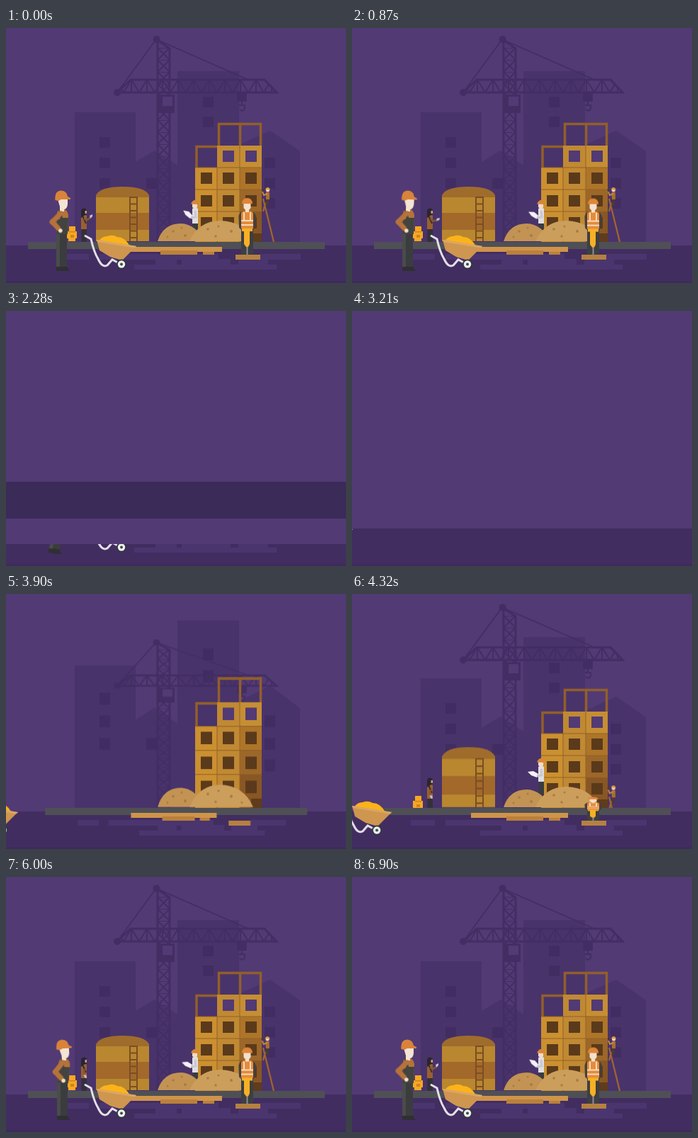
An HTML page without scripts for the animation above (6.93 s loop, 480 by 360 pixels).

```html
<!DOCTYPE html>
<html lang="en">
<head>
<meta charset="utf-8">
<title>Building site</title>
<style>
  html, body { margin: 0; width: 100%; height: 100%; overflow: hidden; background: #523a74; }
  svg { display: block; width: 100vw; height: 100vh; }

  .anim { animation: 6.93s ease-in-out infinite; }
  .panel { animation-name: wipe; }
  .ground { animation-name: ground; }
  .spread { animation-name: spread; transform-origin: 240px 307px; }
  .grow { animation-name: grow; transform-origin: 240px 302px; }
  .rise { animation-name: rise; }
  .crane { animation-name: crane; transform-origin: 222px 302px; }
  .travel { animation-name: travel; animation-timing-function: linear; }
  .gait { animation-name: gait; }
  .torso { animation-name: torso; transform-origin: 79px 288px; }
  .head { animation-name: nod; transform-origin: 79px 257px; }
  .arm { animation-name: arm; transform-origin: 78px 261px; }
  .fore { animation-name: fore; transform-origin: 78px 279px; }
  .thighA { animation-name: thighA; transform-origin: 81px 288px; }
  .kneeA { animation-name: kneeA; transform-origin: 81px 313px; }
  .thighB { animation-name: thighB; transform-origin: 76px 288px; }
  .kneeB { animation-name: kneeB; transform-origin: 76px 313px; }
  .point { animation-name: point; transform-origin: 111px 271px; }
  .paper { animation-name: paper; transform-origin: 263px 267px; }
  .look { animation-name: look; transform-origin: 369px 250px; }
  .drill { animation: drill calc(6.93s / 58) linear infinite; }

  @keyframes wipe {
    0%, 26.97% { transform: translateY(-88px); animation-timing-function: cubic-bezier(.37,0,.63,1); }
    36.06%, 39.2% { transform: translateY(360px); }
    39.21%, 100% { transform: translateY(-88px); }
  }
  @keyframes ground {
    0%, 36.5%, 46.32%, 100% { transform: none; }
    36.51%, 39.6% { transform: translateY(54px); }
  }
  @keyframes spread {
    0%, 36.5%, 58%, 100% { transform: none; }
    36.51%, 51.95% { transform: scaleX(0); animation-timing-function: ease-out; }
  }
  @keyframes grow {
    0%, 36.5%, 61%, 100% { transform: none; }
    36.51%, 51.95% { transform: scaleY(0); animation-timing-function: ease-out; }
    56% { transform: scaleY(1.1); }
    59% { transform: scaleY(.985); }
  }
  @keyframes rise {
    0%, 36.5%, 60%, 100% { transform: none; }
    36.51%, 51.95% { transform: translateY(80px); animation-timing-function: ease-out; }
    56% { transform: translateY(-11px); }
  }
  @keyframes crane {
    0%, 36.5%, 65%, 100% { transform: none; }
    36.51%, 52.7% { transform: scaleY(0); animation-timing-function: ease-out; }
    58.5% { transform: scaleY(1.018); }
    62.34% { transform: scaleY(.99); }
  }
  @keyframes travel {
    0%, 36.5%, 100% { transform: none; }
    36.51%, 53.9% { transform: translateX(-183px); }
    62.34% { transform: translateX(-128px); }
    76.62% { transform: translateX(-34px); animation-timing-function: ease-out; }
    84.4% { transform: none; }
  }
  @keyframes gait {
    0%, 36.5%, 88%, 100% { transform: none; }
    36.6%, 82.7% { transform: translateX(7px); }
  }
  @keyframes torso {
    0%, 17.3%, 88%, 100% { transform: none; }
    25.1% { transform: rotate(7deg); }
    32.9%, 36.5% { transform: rotate(15deg); }
    36.6%, 82.7% { transform: rotate(23deg); }
  }
  @keyframes nod {
    0%, 18%, 90%, 100% { transform: none; }
    9% { transform: rotate(4deg); }
    36.6%, 82.7% { transform: rotate(-16deg); }
  }
  @keyframes arm {
    0%, 18%, 88%, 100% { transform: rotate(45deg); }
    25.1% { transform: rotate(38deg); }
    32.9% { transform: rotate(0); }
    36.6%, 82.7% { transform: rotate(-25deg); }
  }
  @keyframes fore {
    0%, 25.1%, 88%, 100% { transform: rotate(-88deg); }
    36.6%, 82.7% { transform: rotate(-42deg); }
  }
  @keyframes thighA {
    0%, 27%, 87%, 100% { transform: none; }
    32.9%, 36.5% { transform: rotate(12deg); }
    62.34%, 71.86%, 81.39% { transform: rotate(16deg); }
    67.1%, 76.62% { transform: rotate(-13deg); }
  }
  @keyframes kneeA {
    0%, 36.5%, 87%, 100% { transform: none; }
    62.34%, 71.86%, 81.39% { transform: rotate(32deg); }
    67.1%, 76.62% { transform: rotate(18deg); }
  }
  @keyframes thighB {
    0%, 27%, 87%, 100% { transform: none; }
    32.9%, 36.5% { transform: rotate(12deg); }
    62.34%, 71.86%, 81.39% { transform: rotate(-13deg); }
    67.1%, 76.62% { transform: rotate(16deg); }
  }
  @keyframes kneeB {
    0%, 36.5%, 87%, 100% { transform: none; }
    62.34%, 71.86%, 81.39% { transform: rotate(18deg); }
    67.1%, 76.62% { transform: rotate(32deg); }
  }
  @keyframes point {
    0%, 9%, 97%, 100% { transform: none; }
    20%, 86% { transform: rotate(115deg); }
  }
  @keyframes paper {
    0%, 8%, 96%, 100% { transform: rotate(18deg); }
    18%, 84% { transform: none; }
  }
  @keyframes look {
    0%, 50%, 100% { transform: none; }
    25%, 75% { transform: rotate(-2deg); }
  }
  @keyframes drill {
    0%, 100% { transform: none; }
    50% { transform: translateY(1px); }
  }
</style>
</head>
<body>
<svg viewBox="0 0 480 360" preserveAspectRatio="none">
  <defs>
    <clipPath id="above"><path d="M0 0H480V302H0Z"/></clipPath>
    <pattern id="mast" x="214" y="28" width="17" height="17" patternUnits="userSpaceOnUse">
      <path d="M0 0L17 17M17 0L0 17M0 0H17" stroke="#432e64" stroke-width="2"/>
    </pattern>
    <pattern id="truss" x="232" y="73" width="22" height="18" patternUnits="userSpaceOnUse">
      <path d="M0 18L11 0L22 18M11 0V18" fill="none" stroke="#432e64" stroke-width="2"/>
    </pattern>
    <path id="pane" d="M0 0h15v15h-15z"/>
    <path id="win" d="M0 0h16v16h-16z"/>
  </defs>

  <rect width="480" height="360" fill="#523a74"/>
  <g class="anim ground">
    <rect y="307" width="480" height="54" fill="#422d61"/>
    <rect y="357" width="480" height="4" fill="#3e2a5c"/>
  </g>

  <!-- ground streaks -->
  <path class="anim spread" fill="#4b356e" d="M83 319h34v8h-34zM132 319h168v8h-168zM359 319h57v8h-57z
    M211 326h30v8h-30zM248 326h69v8h-69zM328 326h42v8h-42zM181 334h201v7h-201z"/>

  <!-- skyline -->
  <g class="anim grow">
    <path fill="#49336b" d="M97 302V119H183V189L210 173L242 194V61H329V165L373 145L415 174V302Z"/>
    <g fill="#422d62">
      <use href="#pane" x="132" y="154"/><use href="#pane" x="132" y="183"/><use href="#pane" x="132" y="212"/>
      <use href="#pane" x="198" y="212"/>
      <use href="#pane" x="278" y="97"/><use href="#pane" x="278" y="125"/>
      <use href="#pane" x="365" y="183"/><use href="#pane" x="365" y="212"/><use href="#pane" x="365" y="240"/>
    </g>
  </g>

  <g class="anim crane">
    <rect x="214" y="28" width="17" height="274" fill="url(#mast)"/>
    <path fill="url(#truss)" d="M157 91L176 73H365L382 91Z"/>
    <g fill="none" stroke="#432e64" stroke-width="3">
      <path d="M214 16V302M231 28V302M212 16L231 29"/>
      <path d="M157 91H382L365 73H176Z"/>
      <path stroke-width="1.6" d="M212 16L157 91M212 16L342 73"/>
      <path stroke-width="2" d="M333 92V110M329 109H337V114Q334 119 330 115"/>
    </g>
    <g fill="#432e64">
      <circle cx="212.500" cy="16" r="5"/><circle cx="157" cy="91" r="5"/>
      <path d="M215 94H238V120H215ZM326 91H340V104H326Z"/>
    </g>
    <path fill="#523a74" d="M221 97H235V110H221Z"/>
  </g>

  <!-- tank -->
  <g class="anim grow" style="animation-delay:.44s">
    <path fill="#b9872f" d="M127 236H202V301H127Z"/>
    <path fill="#a3692a" d="M127 261H202V285H127Z"/>
    <path fill="#a06c2c" d="M127 239V236Q133 224 164.500 224Q196 224 202 236V239Z"/>
    <path fill="none" stroke="#7b4e24" stroke-width="2" d="M175 238V301M185 238V301M175 239h10M175 248.500h10M175 258h10M175 267.500h10M175 277h10M175 286.500h10M175 296h10"/>
  </g>

  <!-- unfinished block -->
  <g class="anim grow" style="animation-delay:.03s">
    <path fill="none" stroke="#925f2a" stroke-width="3.500" d="M269 198V167.500H298M300.500 167V135.500H359.500V167M330.500 135V167"/>
    <path fill="#cb9030" d="M267 197H298V302H267Z"/>
    <path fill="#c08933" d="M298 166H330V302H298Z"/>
    <path fill="#c68e33" d="M330 166H361V197H330Z"/>
    <path fill="#ae7529" d="M330 197H361V228H330Z"/>
    <path fill="#9c6728" d="M330 228H361V259H330Z"/>
    <path fill="#895724" d="M330 259H361V302H330Z"/>
    <path fill="#5f3c1b" d="M346 290H361V302H346Z"/>
    <path fill="none" stroke="#936226" stroke-width="1" d="M267 197H361M267 228H361M267 259H361M298 197V302M330 166V302"/>
    <g fill="#523a74"><use href="#win" x="306" y="173"/><use href="#win" x="338" y="173"/></g>
    <g fill="#5a3a1b">
      <use href="#win" x="275" y="204"/><use href="#win" x="306" y="204"/><use href="#win" x="338" y="204"/>
      <use href="#win" x="275" y="236"/><use href="#win" x="306" y="236"/><use href="#win" x="338" y="236"/>
      <use href="#win" x="275" y="267"/><use href="#win" x="306" y="267"/><use href="#win" x="338" y="267"/>
    </g>
  </g>

  <g clip-path="url(#above)">
    <!-- surveyor -->
    <g class="anim rise" style="animation-delay:.65s">
      <path fill="none" stroke="#a0642d" stroke-width="2.300" d="M363 241L378 302M366 247L363 259"/>
      <g class="anim look">
        <path stroke="#4a3a35" stroke-width="3.500" d="M369 240V251"/>
        <path fill="#a8702f" d="M367 232H372V242H367Z"/>
        <path fill="none" stroke="#c98a3c" stroke-width="2" d="M369 234L364 236L362 231"/>
        <circle cx="369.500" cy="229" r="2.500" fill="#efd8c2"/>
        <path fill="#dd9a3b" d="M366 228Q367 225 369.500 225Q372 225 373 228.500Z"/>
        <path fill="#4a3a35" d="M361 227H365V230H361Z"/>
      </g>
    </g>
    <!-- engineer -->
    <g class="anim rise" style="animation-delay:.44s">
      <path fill="#3a3c40" d="M263.500 274H271V300H263.500Z"/>
      <path fill="#e0dee4" d="M263 255Q267 252 271 255V276H263Z"/>
      <path fill="#f1dcc8" d="M263 247H270V253L267 256L263 253Z"/>
      <path fill="#d9853b" d="M261 248.500Q263 243 267 243Q271 243 271.500 249Z"/>
      <g class="anim paper">
        <path fill="#f4f2f6" d="M248 262L256 261L263 265L261 270L253 267Z"/>
      </g>
      <path fill="none" stroke="#cbc7d0" stroke-width="3" d="M267 258L268 267L261 268"/>
    </g>
  </g>

  <!-- sand -->
  <g class="anim grow" style="animation-delay:.04s">
    <path fill="#c39353" d="M214 301Q222 276 247 276Q268 277 280 301Z"/>
    <path fill="#cc9e5c" d="M259 301Q272 272 303 272Q336 273 349 301Z"/>
    <g fill="#a87c44">
      <circle cx="236" cy="287" r="1.800"/><circle cx="248" cy="282" r="1.500"/><circle cx="228" cy="295" r="1.500"/><circle cx="253" cy="293" r="2"/>
      <circle cx="285" cy="284" r="1.800"/><circle cx="300" cy="280" r="1.500"/><circle cx="318" cy="287" r="2"/><circle cx="296" cy="294" r="1.700"/><circle cx="333" cy="295" r="1.500"/>
    </g>
  </g>

  <g class="anim spread">
    <path fill="#4f5055" d="M31 302H450V312H31Z"/>
    <path fill="#cf944a" d="M168 309H305V316H168Z"/>
    <path fill="#ba803c" d="M218 314H270V320H218ZM278 316H294V320H278Z"/>
    <path fill="#b58140" d="M324 320H359V327H324Z"/>
  </g>

  <g clip-path="url(#above)">
    <g class="anim rise" style="animation-delay:.54s">
      <path fill="#f6a823" d="M89 280H98V287H100V297H98V301H88V297H86V287H89Z"/>
      <path fill="#d1821f" d="M89 287H98V288.500H89ZM91 292H96V296H91Z"/>
    </g>
    <!-- woman -->
    <g class="anim rise" style="animation-delay:.54s">
      <path fill="#34313a" d="M106.500 281H114V302H106.500Z"/>
      <path fill="#9a6030" d="M106 265Q110 262 114 265V284H106Z"/>
      <path fill="none" stroke="#35302f" stroke-width="2" d="M108 265L113 276"/>
      <g class="anim point">
        <path fill="none" stroke="#8a5630" stroke-width="2.500" d="M110 269L114 271L119 268"/>
        <path fill="#c9c2cf" d="M118 265L122 263L122 266L119 269Z"/>
      </g>
      <path fill="#2a2530" d="M106 268V258Q107 254.500 110 254.500Q114 255 114 259V263L110 265Z"/>
      <path fill="#c99a78" d="M111.500 258H114V262H111.500Z"/>
    </g>
  </g>

  <!-- drill worker -->
  <g class="anim grow" style="animation-delay:.65s;transform-origin:340px 320px">
    <path fill="#3d3f42" d="M332 282H349V320H342L340.500 292L339 320H332Z"/>
    <g class="drill">
      <path fill="none" stroke="#45403f" stroke-width="4" d="M335 261Q330 262 330.500 268L331 281L336 285M346 261Q351 262 351 268L350 281L345 285"/>
      <path fill="#e68b38" d="M332 261Q334 258 340.500 258Q347 258 349 261V283H332Z"/>
      <path fill="#f4dcc0" d="M332 271H349V273H332ZM332 277H349V279H332ZM335 260H337V271H335ZM344 260H346V271H344Z"/>
      <path fill="#f3e0ce" d="M335.500 247H345.500V254L343 257V260H338V257L335.500 254Z"/>
      <path fill="#e08538" d="M333 248Q333.500 240 340.500 240Q347.500 240 348 248Z"/>
      <path fill="#f8b024" d="M333 283H348V287H344V305L342 309H339L336 305V287H333Z"/>
      <path stroke="#8f8f94" stroke-width="2" d="M340.500 309V320"/>
    </g>
  </g>

  <!-- man and barrow -->
  <g class="anim travel">
    <g class="anim gait">
      <g fill="none" stroke="#494c4a" stroke-width="10">
        <g class="anim thighB">
          <path stroke-linecap="round" d="M76 290V313"/>
          <g class="anim kneeB"><path d="M76 312V339"/><path fill="#302f33" stroke="none" d="M71 337H81L86 343H71Z"/></g>
        </g>
        <g class="anim thighA" stroke="#3b3c3e">
          <path stroke-linecap="round" d="M81 290V313"/>
          <g class="anim kneeA"><path d="M81 312V339"/><path fill="#302f33" stroke="none" d="M76 337H86L90 343H76Z"/></g>
        </g>
      </g>
      <g class="anim torso">
        <path fill="#b5733a" d="M72 262Q73 255 79 255Q87 256 88 264L87 289H71Z"/>
        <path fill="#43443f" d="M74 256L77 255L80 268H88L87 291H71L72 270H76Z"/>
        <g class="anim head">
          <path fill="#f4e4d3" d="M72.500 240H87V249Q86 256 82 256V259H76V252Z"/>
          <path fill="#d9833a" d="M69.500 243Q68 230 78 229.500Q86 230 87 238L91 240V242H78L74 244Z"/>
        </g>
        <g class="anim arm" stroke-linecap="round" stroke-width="7" stroke="#b5733a">
          <path d="M78 262V279"/>
          <g class="anim fore"><path d="M78 279V291"/><circle cx="78" cy="296" r="2.800" fill="#f4e0cc" stroke="none"/></g>
        </g>
      </g>
    </g>
    <path fill="none" stroke="#e2dfe6" stroke-width="3" stroke-linecap="round" d="M112 293.500L120 298Q124 316 130 326Q136 339 143 335L150 327L163 334"/>
    <path fill="#fbb31a" d="M131 301Q135 294 143 294Q150 291 157 295Q168 295 175 308Z"/>
    <path fill="#cf9650" d="M128 299L184 308L164 328L147 323L132 314Z"/>
    <path fill="#dba765" d="M128 299L184 308L182 310.500L129 302Z"/>
    <circle cx="163" cy="333.500" r="7" fill="#2f3a3b"/>
    <circle cx="163" cy="333.500" r="5.200" fill="#efeef0"/>
    <circle cx="163" cy="333.500" r="2" fill="#3d4748"/>
  </g>

  <!-- curtain -->
  <g class="anim panel">
    <rect y="-450" width="480" height="538" fill="#523a74"/>
    <rect width="480" height="52" fill="#3b2b59"/>
  </g>
</svg>
</body>
</html>
```
